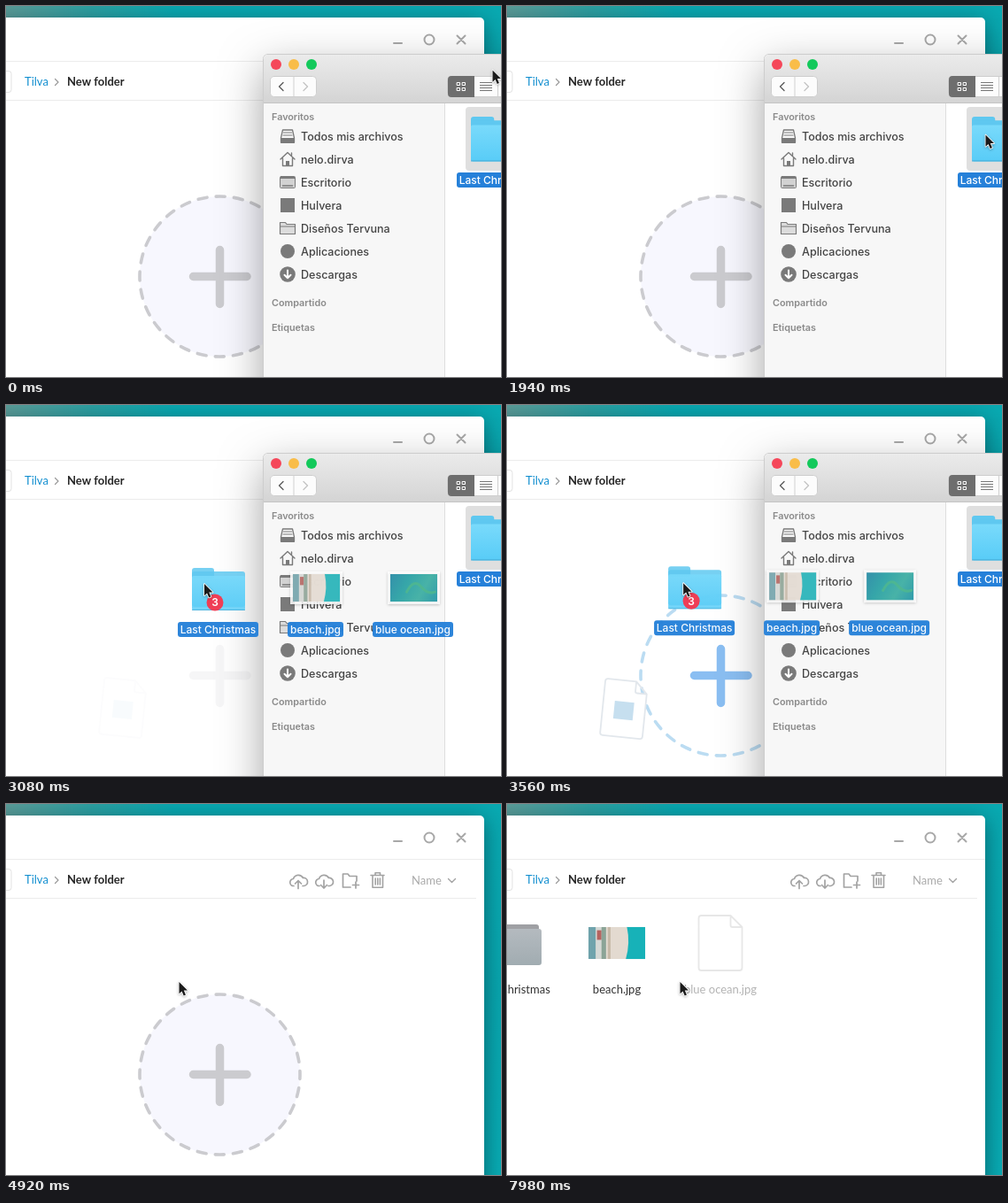
Recreate the animation shown at these times as an HTML page with a canvas. Size 559 by 419 pixels, loop 8000 ms.

```html
<!DOCTYPE html>
<html lang="es">
<head>
<meta charset="utf-8">
<title>Drag and drop upload</title>
<style>
  html, body { margin: 0; width: 100%; height: 100%; overflow: hidden; background: #fff; }
  canvas { display: block; width: 559px; height: 419px; }
</style>
</head>
<body>
<canvas id="stage" width="559" height="419"></canvas>
<script>
const c = document.getElementById('stage').getContext('2d');
const LOOP = 8000;
const WEB = 'Lato, sans-serif', MAC = 'Inter, sans-serif';

// ---- helpers ----
const clamp = v => Math.min(1, Math.max(0, v));
const ramp = (t, from, to) => clamp((t - from) / (to - from));
const ease = p => p * p * (3 - 2 * p);
const mix = (a, b, p) => a + (b - a) * p;

function group(alpha, draw, x = 0, y = 0, angle = 0, scale = 1) {
  if (alpha <= 0) return;
  c.save();
  c.globalAlpha *= alpha;
  c.translate(x, y);
  c.rotate(angle);
  c.scale(scale, scale);
  draw();
  c.restore();
}
function box(x, y, w, h, fill, r = 0, stroke) {
  c.beginPath();
  c.roundRect(x, y, w, h, r);
  if (fill) { c.fillStyle = fill; c.fill(); }
  if (stroke) { c.strokeStyle = stroke; c.lineWidth = 1; c.stroke(); }
}
function disc(x, y, r, fill) {
  c.beginPath();
  c.arc(x, y, r, 0, 7);
  c.fillStyle = fill;
  c.fill();
}
function path(d, color, width = 1.5, fill) {
  const p = new Path2D(d);
  if (fill) { c.fillStyle = fill; c.fill(p); }
  c.strokeStyle = color;
  c.lineWidth = width;
  c.lineCap = c.lineJoin = 'round';
  c.stroke(p);
}
function text(s, x, y, font, color, align = 'left') {
  c.font = font;
  c.fillStyle = color;
  c.textAlign = align;
  c.fillText(s, x, y);
}
function gradient(x0, y0, x1, y1, ...colors) {
  const g = c.createLinearGradient(x0, y0, x1, y1);
  colors.forEach((color, i) => g.addColorStop(i / (colors.length - 1), color));
  return g;
}
function shadowed(color, blur, dy, draw) {
  c.save();
  c.shadowColor = color;
  c.shadowBlur = blur;
  c.shadowOffsetY = dy;
  draw();
  c.restore();
}

// ---- small pictures ----
function beachPhoto(x, y, w, h) {
  box(x, y, w, h, '#e3dad0');
  box(x, y, w * .13, h, '#6fa3ac');
  box(x + w * .13, y, w * .1, h, '#d5d9d6');
  box(x + w * .15, y + h * .1, w * .08, h * .3, '#b5635f');
  box(x + w * .23, y, w * .08, h, '#8ba497');
  box(x + w * .34, y, w * .05, h, '#c7b9a8');
  path(`M${x + w * .68} ${y}H${x + w}V${y + h}H${x + w * .66}Q${x + w * .74} ${y + h / 2} ${x + w * .68} ${y}`,
    '#17b2b8', .1, '#17b2b8');
}
function oceanPhoto(x, y, w, h) {
  box(x, y, w, h, gradient(x, y, x + w, y + h, '#127f9d', '#14989c', '#2aa79a', '#0f8c9f'));
  path(`M${x + w * .35} ${y + h * .65}q${w * .15} ${-h * .5} ${w * .3} ${-h * .2}t${w * .3} ${h * .2}`, '#4fb88f', 3);
}
function blueFolder(x, y) {
  box(x, y, 25, 12, '#5fc8f0', 3);
  box(x, y + 4, 60, 40, '#5fc8f0', 3);
  box(x, y + 9, 60, 39, gradient(0, y + 9, 0, y + 48, '#79dafb', '#58ccf7'), 2);
  box(x, y + 47, 60, 1, '#4bb2dc');
}
function fileTag(name, x, y, w) {
  box(x, y, w, 17, '#2580d9', 3);
  text(name, x + w / 2, y + 13, '500 12px ' + MAC, '#fff', 'center');
}
function sheet(w, h, fold, color, width) {
  const l = -w / 2, r = w / 2, t = -h / 2, b = h / 2;
  path(`M${l + 3} ${t}H${r - fold}L${r} ${t + fold}V${b - 3}q0 3 -3 3H${l + 3}q-3 0 -3 -3V${t + 3}q0 -3 3 -3Z
    M${r - fold} ${t}v${fold - 2}q0 2 2 2H${r}`, color, width, '#fff');
}

// ---- upload window ----
function wallpaper() {
  box(0, 0, 559, 419, gradient(0, 0, 0, 419, '#08a8b0', '#08a4ac', '#08aab2'));
  box(0, 0, 190, 16, gradient(0, 0, 190, 0, '#5b9c98', '#2c9fa1', '#08a8b0'));
}
function webWindow() {
  shadowed('rgba(0,30,40,.5)', 24, 5, () => box(-30, 13, 570, 450, '#fff', 5));
  box(0, 62, 540, 1, '#ececec');
  box(0, 106, 531, 1, '#ececec');
  path('M438 42H447M509.5 33.5l9 9m0 -9l-9 9', '#a8a8a8', 2);
  path('M483.5 38a5.5 5.5 0 1 1 -11 0a5.5 5.5 0 1 1 11 0', '#a8a8a8', 2);
  box(-20, 73.5, 26, 24, null, 3, '#e2e2e2');
  text('Tilva', 21, 90, '13px ' + WEB, '#138fd0');
  path('M55.5 82.5l3.5 3.5l-3.5 3.5', '#999', 1.2);
  text('New folder', 69, 90, 'bold 13px ' + WEB, '#262626');

  const cloud = 'a4 4 0 0 1 -.5 -8a6 6 0 0 1 11 -1a4.5 4.5 0 0 1 1 9h-1.5';
  const gray = '#a3a3a3';
  path('M325 92.5' + cloud + 'M330 95.5v-9m-3.5 3.5l3.5 -3.5l3.5 3.5', gray, 1.7);
  path('M354 92.5' + cloud + 'M359 86v9m-3.5 -3.5l3.5 3.5l3.5 -3.5', gray, 1.7);
  path('M389 94H380.5V79H386l2 2.5H396V87M395 88v7m-3.5 -3.5h7', gray, 1.7);
  path('M412 80.5H427M417 80V77.8H422.5V80M414 81V94.3H425.5V81M417.2 84v7M419.8 84v7M422.4 84v7', gray, 1.6);
  text('Name', 458, 91, '13px ' + WEB, '#aaa');
  path('M499.5 84.5l4 4l4 -4', gray, 1.4);
}
function dropCircle(stroke, fill) {
  c.save();
  c.beginPath();
  c.arc(241.5, 305.5, 90.5, 0, Math.PI * 2);
  if (fill) { c.fillStyle = fill; c.fill(); }
  const period = Math.PI * 2 * 90.5 / 28;
  c.setLineDash([period * .5, period * .5]);
  c.lineDashOffset = period * .25;
  c.lineCap = 'round';
  c.lineWidth = 3.6;
  c.strokeStyle = stroke;
  c.stroke();
  c.restore();
}
const plus = color => path('M211.5 305.5H272M241.5 275.5V336.5', color, 9.5);

function dropZone(t) {
  const hidden = ramp(t, 5150, 5300);
  const back = ramp(t, 4530, 4780);
  const idle = Math.max(1 - ramp(t, 2800, 3050), back) - hidden;
  const idlePlus = Math.max(1 - ramp(t, 2800, 3140), back) - hidden;
  const active = ramp(t, 3130, 3500) * (1 - ramp(t, 4450, 4650));
  group(idle, () => dropCircle('#cbcbcf', '#f7f7fe'));
  group(active, () => dropCircle('#bbdcf2'));

  const slide = ramp(t, 3080, 4240);
  const leave = 1 - ramp(t, 4400, 4600);
  group(ramp(t, 3020, 3500) * leave, () => {
    sheet(48, 64, 13, '#e2e7ec', 1.8);
    box(-11, -8, 22, 20, '#c6dfef');
  }, 132, 342 + 38 * slide ** 4, .1);
  group(.55 * ramp(t, 3700, 4100) * leave, () => {
    sheet(44, 58, 12, '#d3e0ea', 1.8);
    path('M-14 -16h14M-14 -9h26M-14 -2h26M-14 5h26', '#d3e0ea', 1.6);
    text('DOCX', 0, 21, 'bold 11px ' + WEB, '#bcd2e2', 'center');
  }, 243, mix(236, 281, ease(ramp(t, 3650, 4240))), -.15);

  group(idlePlus, () => plus('#cbcbcf'));
  group(active, () => plus('#8abef2'));
}

function uploads(t) {
  const label = (s, x, color) => text(s, x, 213.5, '13px ' + WEB, color, 'center');
  const pending = (name, x, alpha) => group(alpha, () => {
    group(1, () => sheet(49, 62, 13, '#e7e7e7', 1.8), x, 157);
    label(name, x, '#b3b3b3');
  });
  group(.4 * ramp(t, 5300, 5400) + .6 * ramp(t, 5560, 5680), () => {
    box(-25, 136, 61, 20, '#9fa0a4', 3);
    box(-25, 141, 64, 41, gradient(0, 141, 0, 182, '#b4babf', '#a1acb1'), 3);
    label('Last Christmas', 7, '#333');
  });
  if (t < 6900) pending('beach.jpg', 124, ramp(t, 5850, 5950));
  else {
    beachPhoto(92, 139, 64, 36);
    label('beach.jpg', 124, '#333');
  }
  pending('blue ocean.jpg', 241, ramp(t, 7000, 7100));
}

// ---- file manager ----
const ICON = '#7a7a7a';
const sidebar = [
  ['Todos mis archivos', () => {
    path('M-5.5 -7H5.5L7.5 2V7H-7.5V2Z', ICON, 1.3);
    path('M-4.5 -4H4.5M-5 -1H5', ICON, 1.2);
    box(-8, 2, 16, 6, ICON, 1);
  }],
  ['nelo.dirva', () => {
    path('M-8 0L0 -7.5L8 0M4.5 -7v3M-5.5 -1V7.5H5.5V-1', ICON, 1.4);
    box(-2, 2, 4, 6, ICON);
  }],
  ['Escritorio', () => {
    box(-8.5, -6.5, 17, 13, '#d2d2d2', 1, ICON);
    box(-8, -6, 16, 2, ICON);
    path('M-5.5 4h11', ICON, 1.6);
  }],
  ['Hulvera', () => box(-8, -8, 16, 16, ICON)],
  ['Diseños Tervuna', () => path('M-8.5 6.5V-6.5H-2.5L-1 -4.5H8.5V6.5ZM-8.5 -2H8.5', ICON, 1.2, '#dcdcdc')],
  ['Aplicaciones', () => disc(0, 0, 8, ICON)],
  ['Descargas', () => {
    disc(0, 0, 8.8, ICON);
    path('M0 -4.5V4M-3.5 .8L0 4.3L3.5 .8', '#fff', 2);
  }],
];
function fileManager() {
  shadowed('rgba(0,0,0,.37)', 48, 16, () => box(291, 55, 330, 420, '#fff', 5));
  box(290.5, 54.5, 330, 420, '#fff', 5, '#cdcdcd');
  box(291, 55, 300, 54, gradient(0, 55, 0, 109, '#ebebeb', '#d4d4d4'), [5, 0, 0, 0]);
  box(291, 109, 300, 1, '#c4c4c4');
  ['#f5475a', '#f9bd49', '#13c95b'].forEach((color, i) => disc(305 + i * 20, 66, 6, color));

  box(298.5, 79.5, 52, 23, '#fcfcfc', 4, '#cecece');
  box(324.5, 80, 1, 22, '#d0d0d0');
  path('M313 86.5l-4.5 4.5l4.5 4.5', '#5c5c5c', 1.4);
  path('M336 86.5l4.5 4.5l-4.5 4.5', '#c4c4c4', 1.4);
  box(498.5, 79.5, 120, 23, '#fcfcfc', 4, '#cecece');
  box(499, 79, 30, 24, '#6e6e6e', [4, 0, 0, 4]);
  for (const x of [509.5, 515.5]) for (const y of [86.5, 92.5]) box(x, y, 3, 3, null, 0, '#fff');
  for (let i = 0; i < 4; i++) box(535, 86 + i * 3, 14, 1, '#787878');
  box(555, 80, 1, 22, '#cfcfcf');

  box(291, 110, 204, 309, '#f7f7f7');
  box(495, 110, 1, 309, '#dedede');
  const heading = (s, y) => text(s, 300, y, '600 10.8px ' + MAC, '#8a8a8a');
  heading('Favoritos', 129);
  heading('Compartido', 339);
  heading('Etiquetas', 367);
  sidebar.forEach(([name, icon], i) => {
    const y = 147 + i * 26;
    group(1, icon, 318, y);
    text(name, 333, y + 5, '500 12.55px ' + MAC, '#444');
  });

  box(519, 114, 80, 72, '#dfdfdf', 4);
  group(1, () => blueFolder(0, 0), 525, 125, 0, 1.05);
  fileTag('Last Christmas', 509, 188, 91);
}

// ---- dragging ----
function draggedFiles(x, y) {
  const photo = (px, draw) => {
    shadowed('rgba(0,0,0,.35)', 3, 1, () => box(px, y + 4, 59, 37, '#fff'));
    draw(px + 3, y + 7, 53, 31);
  };
  group(.85, () => {
    blueFolder(x, y);
    photo(x + 111, beachPhoto);
    photo(x + 221, oceanPhoto);
  });
  group(.96, () => {
    fileTag('Last Christmas', x - 16, y + 61, 91);
    fileTag('beach.jpg', x + 108, y + 61, 63);
    fileTag('blue ocean.jpg', x + 204, y + 61, 91);
  });
  disc(x + 26, y + 39, 9.5, '#ef3e56');
  text('3', x + 26, y + 43.5, '600 12px ' + MAC, '#fff', 'center');
}
function pointer(x, y) {
  const arrow = 'M0 0V14.2L3.3 11.2L5.6 16.6L8 15.6L5.7 10.3H10.2Z';
  group(1, () => {
    shadowed('rgba(0,0,0,.3)', 3, 1, () => path(arrow, '#fff', 1.8));
    path(arrow, 'transparent', 1, '#1a1a1a');
  }, x, y, 0, .93);
}

function render(t) {
  const approach = ease(ramp(t, 700, 1500));
  const drag = ease(ramp(t, 2050, 3000));
  const settle = ease(ramp(t, 3080, 3700));
  const track = (a, b, d) => mix(mix(a, b, drag), d, settle);

  wallpaper();
  webWindow();
  dropZone(t);
  uploads(t);
  if (t < 4600) fileManager();
  if (t > 2050 && t < 4450) draggedFiles(track(527, 210, 178), track(126, 184, 182));
  pointer(track(mix(549.5, 540.5, approach), 224, 195.5), track(mix(72.5, 145.5, approach), 202, 201));
}

function tick() {
  render(performance.now() % LOOP);
  requestAnimationFrame(tick);
}
tick();
</script>
</body>
</html>
```
